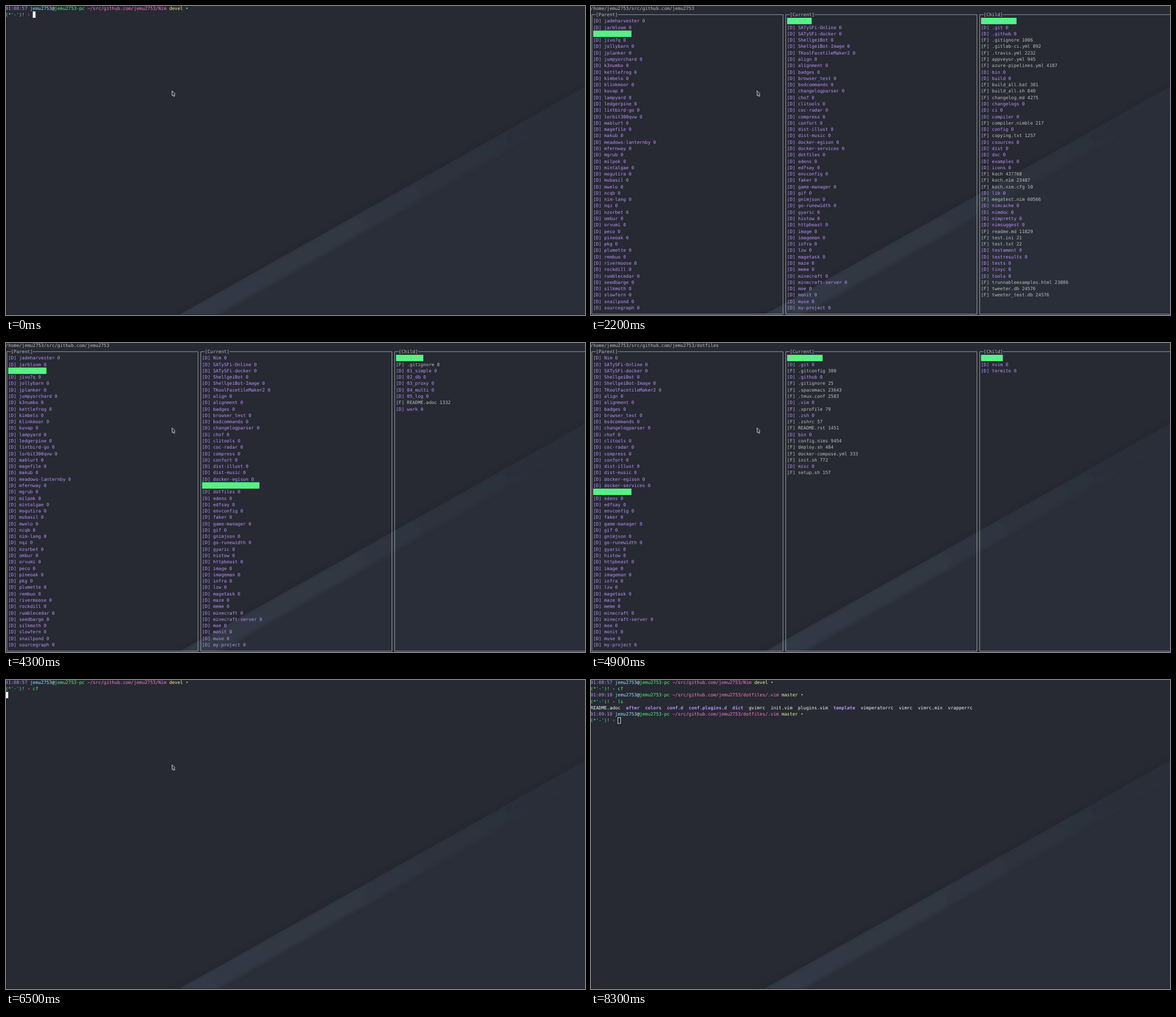
An HTML page that plays this animation: 1024x547 px, repeating every 8400 ms.

```html
<!DOCTYPE html>
<html lang="en">
<head>
<meta charset="utf-8">
<title>Terminal file browser</title>
<style>
  html, body { margin: 0; width: 100%; height: 100%; overflow: hidden; background: #272933; }
  svg { display: block; width: 100%; height: 100%; }
  text {
    font-family: "DejaVu Sans Mono", monospace;
    font-size: 8.02px;
    white-space: pre;
    text-rendering: geometricPrecision;
  }
</style>
</head>
<body>
<svg id="stage" viewBox="0 0 1024 547" xmlns="http://www.w3.org/2000/svg">
  <defs>
    <linearGradient id="band" gradientUnits="userSpaceOnUse" x1="340" y1="547" x2="1024" y2="163">
      <stop offset="0" stop-color="#323a45"/>
      <stop offset=".4" stop-color="#303742"/>
      <stop offset=".7" stop-color="#2d313c"/>
      <stop offset="1" stop-color="#2a2d37"/>
    </linearGradient>
    <filter id="soft" filterUnits="userSpaceOnUse" x="0" y="0" width="1100" height="640">
      <feGaussianBlur stdDeviation="3"/>
    </filter>
    <clipPath id="slope"><path d="M305 547L1024 143V547Z"/></clipPath>
  </defs>
  <rect width="1024" height="547" fill="#272933"/>
  <path d="M270 566.7L1060 122.8" stroke="#20222b" stroke-width="5" opacity=".4" filter="url(#soft)"/>
  <path d="M305 547L1024 143V547Z" fill="#2a2e38"/>
  <g clip-path="url(#slope)">
    <path d="M230 589L1080 111.5V144L300 589Z" fill="url(#band)" filter="url(#soft)"/>
  </g>
  <path d="M0 0H1.5V546H1024V547H0Z" fill="#1f212a"/>
  <g id="scenes"></g>
  <path id="pointer" d="M.6 .8L6 6.3L4.4 7.2L5.6 9.8L3.9 10.8L2.6 8.2L1 9.4Z"
        fill="#272933" stroke="#e6e6df" stroke-width=".9" stroke-linejoin="round"/>
</svg>
<script>
const LOOP = 8400;
const LEFT = -0.9, COL = 4.83, ROW = 11.28;
const C = {
  purple: '#bd93f9', cyan: '#8be9fd', white: '#f8f8f2', green: '#50fa7b',
  pink: '#ff79c6', yellow: '#f1fa8c', grey: '#bfbfbf'
};
const USER = 'jemu2753';
const BASE = `/home/${USER}/src/github.com/${USER}`;

const colX = c => LEFT + c * COL;
const rowY = r => 4 + r * ROW;

function add(parent, tag, attrs, content) {
  const node = document.createElementNS('http://www.w3.org/2000/svg', tag);
  for (const key in attrs) node.setAttribute(key, attrs[key]);
  if (content) node.textContent = content;
  return parent.appendChild(node);
}

// Each part is [string, colour, bold?].
function write(g, col, row, parts, opacity = 1) {
  const line = add(g, 'text', { x: colX(col), y: rowY(row) + 2.8, opacity });
  for (const [str, fill, bold] of parts)
    add(line, 'tspan', { fill, 'font-weight': bold ? 700 : 400 }, str);
}

function cell(g, col, row, count, fill) {
  add(g, 'rect', { x: colX(col), y: rowY(row) - ROW / 2, width: count * COL, height: ROW, fill });
}

// Directories are bare names, files are name:size.
const list = str => str.trim().split(/\s+/);

const owners = list(`jadeharvester jarbloom ${USER} jivo7q jollybarn jplanker jumpyorchard
  k3numbo kettlefrog kimbelo klinkmoor kuvap lampyard ledgerpine lintbird-go lorbit300qvw
  mablurt magefile makub meadows-lanternby mfernway mgrub milpok mintalgae mogutira mubasil
  mwelo ncqb nim-lang nqz nzorbet ombur orvumi peco pineoak pkg plumette rembuo rivermoose
  rockdill rumblecedar seedbarge silkmoth slowfern snailpond sourcegraph`);

const repos = list(`Nim SATySFi-Online SATySFi-docker ShellgeiBot ShellgeiBot-Image
  TKoolFacetileMaker2 align alignment badges browser_test bsdcommands changelogparser chof
  clitools coc-radar compress confort dist-illust dist-music docker-egison docker-services
  dotfiles edens edfsay envconfig faker game-manager gif gnimjson go-runewidth gyaric histow
  httpbeast image imageman infra lzw magetask maze meme minecraft minecraft-server moe monit
  muse my-project`);

const nim = list(`.builds .git .github .gitignore:1006 .gitlab-ci.yml:892 .travis.yml:2232
  appveyor.yml:945 azure-pipelines.yml:4187 bin build build_all.bat:381 build_all.sh:840
  changelog.md:4275 changelogs ci compiler compiler.nimble:217 config copying.txt:1257
  csources dist doc examples icons koch:437768 koch.nim:23487 koch.nim.cfg:10 lib
  megatest.nim:60566 nimcache nimdoc nimpretty nimsuggest readme.md:11829 test.ini:21
  test.txt:22 testament testresults tests tinyc tools trunnableexamples.html:23886
  tweeter.db:24576 tweeter_test.db:24576`);

const dotfiles = list(`.config .git .gitconfig:300 .github .gitignore:25 .spacemacs:23643
  .tmux.conf:2583 .vim .xprofile:79 .zsh .zshrc:57 README.rst:1451 bin config.nims:9454
  deploy.sh:484 docker-compose.yml:333 init.sh:772 misc setup.sh:157`);

const builds = list('freebsd.yml:744');
const online = list('.git LICENSE:1065 README.md:41');
const services = list(`.git .gitignore:8 01_simple 02_db 03_proxy 04_multi 05_log
  README.adoc:1332 work`);
const config = list('i3 nvim termite');

function panel(g, index, title, items, picked) {
  const first = index * 71;
  const x1 = colX(first + .5), x2 = colX(first + 70.5);
  const gap1 = colX(first + 2), gap2 = colX(first + 4 + title.length);
  const y1 = rowY(1), y2 = rowY(48);
  add(g, 'path', {
    d: `M${gap1} ${y1}H${x1}V${y2}H${x2}V${y1}H${gap2}`,
    fill: 'none', stroke: '#b4b6b9', 'stroke-width': .8
  });
  write(g, first + 2, 1, [[`[${title}]`, C.grey]]);
  items.forEach((item, i) => {
    const [name, size] = item.split(':');
    const label = `[${size ? 'F' : 'D'}] ${name} ${size || 0}`;
    const on = i === picked;
    if (on) cell(g, first + 1, i + 2, label.length, C.green);
    write(g, first + 1, i + 2, [[label, size ? C.grey : C.purple]], on ? .6 : 1);
  });
}

function browser(path, parent, parentPick, current, currentPick, child) {
  return g => {
    write(g, 0, 0, [[path, C.grey]]);
    panel(g, 0, 'Parent', parent, parentPick);
    panel(g, 1, 'Current', current, currentPick);
    panel(g, 2, 'Child', child, 0);
  };
}

function prompt(g, row, time, dir, branch, command = '') {
  write(g, 0, row, [
    [time + ' ', C.purple], [USER, C.cyan], ['@', C.white], [`${USER}-pc `, C.green],
    [`~/src/github.com/${USER}/${dir} `, C.pink], [branch + ' ', C.yellow], ['•', C.green]
  ]);
  write(g, 0, row + 1, [["(*'-')! ", C.green], ['› ', C.pink], [command, C.green]]);
}

function start(command, col, row) {
  return g => {
    prompt(g, 0, '01:08:57', 'Nim', 'devel', command);
    cell(g, col, row, 1, C.white);
  };
}

function listing(hollow) {
  return g => {
    const dirs = list('after colors conf.d conf.plugins.d dict template');
    const names = list(`README.adoc after colors conf.d conf.plugins.d dict gvimrc init.vim
      plugins.vim template vimperatorrc vimrc vimrc.min vrapperrc`);
    prompt(g, 0, '01:08:57', 'Nim', 'devel', 'cf');
    prompt(g, 2, '01:09:10', 'dotfiles/.vim', 'master', 'ls');
    write(g, 0, 4, names.map(n => {
      const dir = dirs.includes(n);
      return [n + '  ', dir ? C.purple : C.white, dir];
    }));
    prompt(g, 5, '01:09:10', 'dotfiles/.vim', 'master');
    if (hollow) {
      add(g, 'rect', {
        x: colX(10) + .1, y: rowY(6) - ROW / 2 + .4, width: COL, height: ROW - .8,
        fill: 'none', stroke: C.white, 'stroke-width': .8
      });
    } else cell(g, 10, 6, 1, C.white);
  };
}

const timeline = [
  [0, start('', 10, 1)],
  [500, start('cf', 12, 1)],
  [800, browser(BASE + '/Nim', repos, 0, nim, 0, builds)],
  [2200, browser(BASE, owners, 2, repos, 0, nim)],
  [2700, browser(BASE, owners, 2, repos, 1, online)],
  [4300, browser(BASE, owners, 2, repos, 20, services)],
  [4900, browser(BASE + '/dotfiles', repos, 21, dotfiles, 0, config)],
  [5600, browser(BASE + '/dotfiles', repos, 21, dotfiles, 4, [])],
  [6500, start('cf', 0, 2)],
  [7500, listing(false)],
  [8300, listing(true)]
];

const root = document.getElementById('scenes');
const pointer = document.getElementById('pointer');
const scenes = timeline.map(([from, draw]) => {
  const g = add(root, 'g', { display: 'none' });
  draw(g);
  return { from, g };
});

let shown = null;
function update(t) {
  const next = scenes.filter(s => s.from <= t).pop();
  if (next !== shown) {
    if (shown) shown.g.setAttribute('display', 'none');
    next.g.removeAttribute('display');
    shown = next;
  }
  pointer.setAttribute('transform', t < 7900 ? 'translate(293 149.3)' : 'translate(90 24.3)');
  pointer.setAttribute('visibility', t < 8300 ? 'visible' : 'hidden');
}

function tick() {
  update(performance.now() % LOOP);
  requestAnimationFrame(tick);
}
tick();
</script>
</body>
</html>
```
